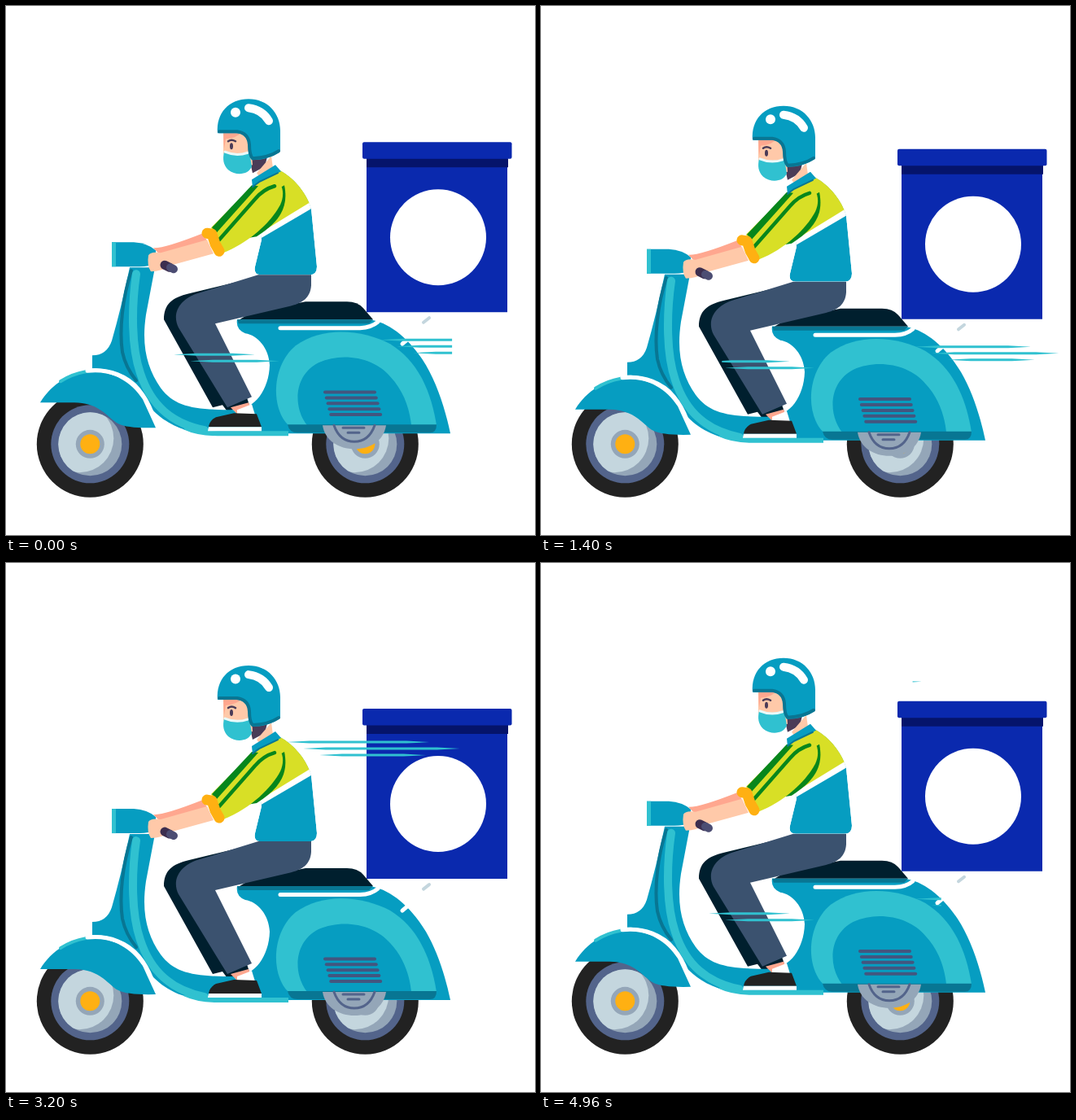
An HTML page that plays this animation: 650x650 px, repeating every 5000 ms.

```html
<!DOCTYPE html>
<html lang="en">
<head>
<meta charset="utf-8">
<title>Scooter courier</title>
<style>
html, body { margin: 0; width: 100%; height: 100%; overflow: hidden; background: #fff; }
svg { display: block; width: 100vw; height: 100vh; }
.teal { fill: #069dc1; } .aqua { fill: #30c1d0; } .deep { fill: #087693; }
.ink { fill: #001f2e; } .coal { fill: #222; } .skin { fill: #ffc9a9; } .blush { fill: #ffa78f; }
.lime { fill: #d8df26; } .leaf { fill: #07861c; } .amber { fill: #ffb012; }
.steel { fill: #94a6b8; } .slate { fill: #53648b; } .pale { fill: #c4d6de; } .white { fill: #fff; }
.navy { fill: #05146b; } .blue { fill: #0a29ae; } .plum { fill: #4a3b57; }
.line { fill: none; stroke-linecap: round; stroke-linejoin: round; }
</style>
</head>
<body>
<svg viewBox="0 0 650 650" xmlns="http://www.w3.org/2000/svg">
<defs>
  <clipPath id="hubClip"><circle r="39"/></clipPath>
  <clipPath id="torsoClip"><path id="torso" d="M303 222L337 203C356 213 371 234 375 250L382 321Q382 331 373 331H313Q304 331 306 321L314 288Z"/></clipPath>
  <g id="wheel">
    <circle r="65.5" class="coal"/>
    <circle r="48" class="slate"/>
    <circle r="39" class="steel"/>
    <circle cx="-13" cy="-7" r="42" class="pale" clip-path="url(#hubClip)"/>
    <circle r="17.5" class="steel"/>
    <circle r="12" class="amber"/>
  </g>
</defs>
<rect width="650" height="650" class="white"/>
<use href="#wheel" x="103.300" y="538.300"/>
<use href="#wheel" x="441.300" y="538.300"/>

<g id="ride">
  <!-- far leg -->
  <path class="ink" d="M194 386C194 367 204 359 225 354L312 333L330 350L235 384L296 482L299 491L272 499L266 491L254 494Z"/>

  <!-- scooter frame -->
  <path class="teal" d="M284 386H446C472 389 498 412 516 442C530 466 540 497 546 526H252C222 526 198 515 181 498L163 474C150 455 132 446 106 446V430Q124 430 130 412Q141 374 152 322H183L172 380C166 420 174 447 190 470C208 494 232 497 282 497C306 496 323 472 324 442C323 421 309 405 294 403Q282 398 284 386Z"/>
  <path class="line" stroke="#087693" stroke-width="4" d="M154 326C143 360 139 399 143 426Q147 445 160 461"/>
  <path class="line" stroke="#30c1d0" stroke-width="10" d="M160 330C154 372 154 420 165 452C178 492 204 514 244 522"/>
  <path class="aqua" d="M225 516Q240 523 260 523H347V529H260Q235 529 218 521Z"/>
  <path class="teal" d="M130 291H157Q174 292 184 301V317Q176 321 164 321H130Z"/>
  <path class="aqua" d="M130 291H135V321H130Z"/>

  <!-- rear shell -->
  <path class="aqua" d="M347 516C326 496 325 444 356 418C390 393 440 399 472 416C505 436 522 472 529 516Z"/>
  <path class="teal" d="M370 516C352 493 354 454 384 439C415 425 454 434 472 456C489 474 496 496 498 516Z"/>
  <path class="deep" d="M346 515H529Q529 525 521 525H358Q348 525 346 515Z"/>
  <g id="vents"></g>
  <path class="steel" d="M389 516C392 535 409 545 428 545C448 545 464 535 467 516Z"/>
  <path class="line" stroke="#53648b" stroke-width="3" d="M403 516Q410 536 428 536T453 516M414 519H440M420 525H434"/>
  <path class="ink" d="M287 386L302 377L368 364H419Q432 364 439 372L451 386Z"/>
  <path class="deep" d="M284 386H451L446 391H286Z"/>
  <path class="line" stroke="#fff" stroke-width="5" d="M337 396.500H435Q449 396 457 389M487 416L494 410"/>
  <path class="line" stroke="#c4d6de" stroke-width="4" d="M513 389.500L520 384"/>

  <!-- front fender -->
  <path class="teal" d="M42 488C56 465 80 450 106 450C133 450 154 463 168 484L184 519Q150 520 138 514C126 508 116 488 84 488Z"/>
  <path class="line" stroke="#30c1d0" stroke-width="4" d="M67 462Q81 453 98 450"/>
  <path class="line" stroke="#fff" stroke-width="5" d="M100 449C127 446 150 456 163 472Q173 484 179 500"/>

  <!-- near leg -->
  <path class="blush" d="M276 494L298 488L302 497L284 502Z"/>
  <path class="white" d="M284 497L302 490L306 503H284Z"/>
  <path class="coal" d="M258 506L280 501L308 502L314 518H249Q250 510 258 506Z"/>
  <path class="white" d="M249 518H314V523H248Z"/>
  <path fill="#3b526f" d="M310 331H375V344C374 359 365 366 347 370L257 391L302 481L272 494L212 396C203 378 214 361 235 354Z"/>

  <!-- arms and jacket -->
  <path class="blush" d="M181 298Q194 299 242 280L248 291L190 307Z"/>
  <path class="skin" d="M175 307Q178 302 190 304L247 288L255 305L204 319Q191 327 178 327Q173 320 175 307Z"/>
  <path class="line" stroke="#3c2e4f" stroke-width="11" d="M195 319L201 322"/>
  <path class="line" stroke="#4c4d73" stroke-width="10" d="M202 322L206 324"/>
  <path class="plum" d="M299 188L322 182L318 198L303 206Z"/>
  <path class="skin" d="M308 206L326 185L328 200L314 214Z"/>
  <g clip-path="url(#torsoClip)">
    <use href="#torso" class="teal"/>
    <path class="lime" d="M300 195H385V238L312 281Z"/>
    <path class="white" d="M310 281L380 238V247L310 288Z"/>
  </g>
  <path class="leaf" d="M342 221C347 246 339 264 308 284L296 286L326 230Z"/>
  <path class="lime" d="M303 222L326 211C339 215 344 230 337 245C327 264 302 290 267 304L252 273Z"/>
  <path class="leaf" d="M302 221L310 222L259 279L253 273Z"/>
  <path class="line" stroke="#07861c" stroke-width="4.500" d="M262 288L306 238Q316 226 330 222"/>
  <path class="teal" d="M302 214L331 196L338 204L311 217L303 224Z"/>
  <path class="line" stroke="#087693" stroke-width="2" d="M303 223L311 217L334 206"/>
  <path class="line" stroke="#ffb012" stroke-width="13" d="M247 280L253 281L257 293L262 302"/>

  <!-- head -->
  <path class="skin" d="M267 153H300L303 196L275 202L267 181Z"/>
  <path class="blush" d="M267 155H290Q284 163 270 164L268 176Z"/>
  <path class="line" stroke="#4a3b57" stroke-width="2.500" d="M273 167Q277 164 282 167"/>
  <ellipse cx="277" cy="173" rx="2" ry="4" class="plum"/>
  <path class="aqua" d="M268 180Q282 186 299 180L302 198C298 208 283 210 273 202C267 196 266 189 268 180Z"/>
  <path class="line" stroke="#e9fafa" stroke-width="3" d="M269 180Q283 186 297 181"/>
  <path class="teal" d="M260 157C258 132 274 115 298 115C322 115 337 133 337 154V179C328 187 314 190 303 190Q298 187 298 173C297 160 291 157 282 157Z"/>
  <path class="line" stroke="#087693" stroke-width="4" d="M262 155H284Q298 157 299 171Q299 184 303 188Q323 187 335 179"/>
  <circle cx="282" cy="131.500" r="6" class="white"/>
  <path class="line" stroke="#fff" stroke-width="10" d="M298 126Q315 128 323 142"/>

  <!-- delivery box -->
  <rect x="443" y="186" width="173" height="191" class="blue"/>
  <rect x="443" y="188" width="174" height="11" class="navy"/>
  <rect x="438" y="168" width="183.500" height="20.500" rx="2" class="blue"/>
  <circle cx="531" cy="285" r="59" class="white"/>
  <g id="wind" class="aqua"></g>
</g>
</svg>
<script>
const LOOP = 5000, STEP = 40, BOUNCE = 500, GUST = 1250;
const GROW = .1, FADE = .3, ERASE = .08;
const TAU = 2 * Math.PI;
const ride = document.getElementById('ride');
const wind = document.getElementById('wind');

function add(parent, tag, attrs) {
  const el = document.createElementNS('http://www.w3.org/2000/svg', tag);
  for (const k in attrs) el.setAttribute(k, attrs[k]);
  return parent.appendChild(el);
}

const clamp = x => Math.max(0, Math.min(1, x));
const hump = (p, from, width) => Math.sin(Math.PI * clamp((p - from) / width)) ** 2;

for (let i = 0; i < 5; i++) {
  add(document.getElementById('vents'), 'path', {
    class: 'line', stroke: '#43567f', 'stroke-width': 4,
    d: `M${392 + 1.8 * i} ${475.3 + 6.9 * i}h61`
  });
}

// A thin streak with tapered ends
const streak = (x, y, len) =>
  `M${x} ${y}l28 -1.5h${len - 56}l28 1.5l-28 1.5h${56 - len}Z`;

// Gusts follow one another at even intervals
const gusts = [
  { x: 460, y: 411, len: 142, rows: 3 },
  { x: 178, y: 298, len: 190, rows: 3 },
  { x: 345, y: 209, len: 175, rows: 3 },
  { x: 341, y: 136, len: 97, rows: 2 },
  { x: 206, y: 429, len: 100, rows: 2 }
].map(({ x, y, len, rows }, k) => {
  const clip = add(wind, 'clipPath', { id: 'gust' + k });
  const mask = add(clip, 'rect', { y: 0, height: 650 });
  let d = '';
  for (let i = 0; i < rows; i++) {
    d += streak(x + 20 * i, y + 8 * i, len * [1, 1.1, .75][i]);
  }
  add(wind, 'path', { d, 'clip-path': `url(#gust${k})` });
  return { mask, x, span: 20 + len * 1.1, start: (.95 + .215 * k) % 1 };
});

function draw(t) {
  const p = t % BOUNCE / BOUNCE, q = t % GUST / GUST;
  const lift = 7 - 10 * Math.cos(TAU * (p - .08)) + 1.1 * Math.cos(2 * TAU * p - .46);
  const dip = hump(p, .42, .26);
  const tilt = 1.25 * hump(p, .09, .28) - .3 * dip;
  ride.setAttribute('transform', `translate(${-dip} ${lift}) rotate(${tilt} 42 530)`);
  for (const g of gusts) {
    const u = (q - g.start + 1) % 1;
    const head = clamp(u / GROW), tail = clamp((u - FADE) / ERASE);
    g.mask.setAttribute('x', g.x + g.span * tail);
    g.mask.setAttribute('width', g.span * Math.max(0, head - tail));
  }
}

const begin = performance.now();
function tick() {
  const t = (performance.now() - begin) % LOOP;
  draw(Math.floor(t / STEP) * STEP);
  requestAnimationFrame(tick);
}
draw(0);
requestAnimationFrame(tick);
</script>
</body>
</html>
```
